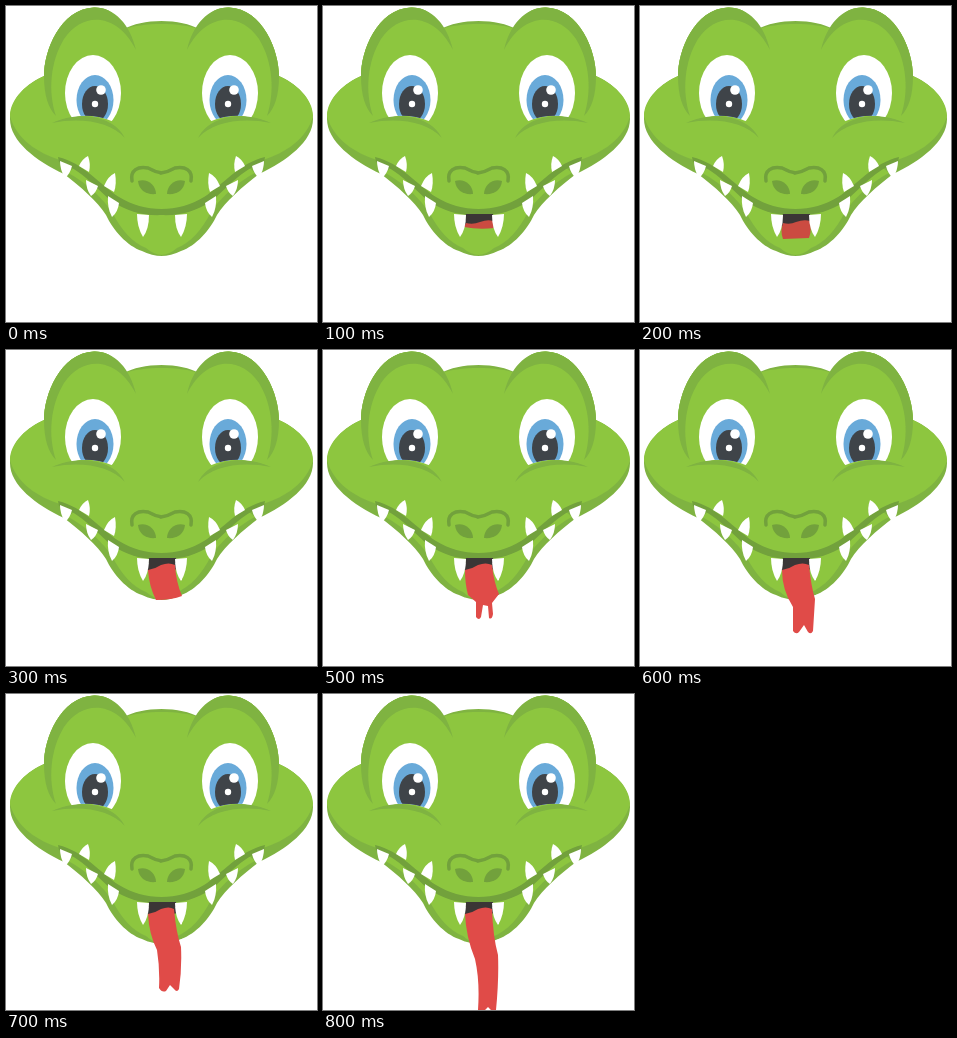
Write an HTML page that moves like this. It is 311x316 px and loops after 1000 ms.

```html
<!DOCTYPE html>
<html lang="en">
<head>
<meta charset="utf-8">
<title>Crocodile</title>
<style>
  html, body { margin: 0; width: 100%; height: 100%; overflow: hidden; background: #fff; }
  svg { display: block; width: 311px; height: 316px; }
  .skin { fill: #8dc63f; }
  .shade { fill: #7fb341; }
  .dark { fill: #72a13c; }
  .line { fill: none; stroke: #72a13c; stroke-width: 3.5; stroke-linecap: round; }
  .white { fill: #fff; }
  .mouth { fill: #3b3636; animation: open 1s step-end infinite; }
  .tongue { animation: grow 1s step-end infinite, tint 1s step-end infinite; }

  @keyframes open {
    0% { visibility: hidden; }
    10%, 100% { visibility: visible; }
  }
  @keyframes tint {
    0% { fill: #cb4b41; }
    30%, 100% { fill: #e04b48; }
  }
  @keyframes grow {
    0% { d: path("M0 0"); }
    10% { d: path("M143 217Q150 219 157 216Q165 213 170 215L171 222Q156 224 141 221Z"); }
    20% { d: path("M143 217Q150 219 156 216Q164 213 170 215Q172 224 169 232L143 233Q140 225 143 217Z"); }
    30% { d: path("M142 220Q149 219 155 215Q163 212 169 215Q170 232 176 246Q166 250 150 250Q143 236 142 220Z"); }
    40% { d: path("M142 220Q149 219 155 215Q163 212 169 215Q171 233 176 245L169 251L169 258Q167 261 165 254L160 254Q158 261 154 258L153 252L145 245Q142 234 142 220Z"); }
    50% { d: path("M142 220Q149 219 155 215Q163 212 169 215Q171 233 176 244L169 253L170 264Q169 270 166 268L165 256L160 255L158 267Q156 271 153 267L153 252L145 245Q142 234 142 220Z"); }
    60% { d: path("M142 220Q149 219 155 215Q163 212 169 215Q171 236 175 249L173 281Q171 285 168 282L164 275L159 282Q156 285 153 281L153 257Q142 240 142 220Z"); }
    70% { d: path("M142 220Q149 219 155 215Q163 212 168 215Q170 238 175 253Q176 275 173 295Q171 299 168 295L164 291L160 297Q156 299 153 294Q154 275 151 256Q143 240 142 220Z"); }
    80%, 100% { d: path("M142 220Q149 219 155 215Q163 212 169 215Q170 243 175 261Q176 285 173 316L168 316L165 313L162 316L155 316Q157 287 152 265Q143 243 142 220Z"); }
  }
</style>
</head>
<body>
<svg viewBox="0 0 311 316">
  <defs>
    <clipPath id="lid"><path d="M50 40H125V130Q106 108 74 110L50 116Z"/></clipPath>

    <g id="half">
      <path class="shade" d="M156 15C140 15 127 18 118 23C112 10 103 1 88 1.500C54 3 38 45 38 70C22 77 4 92 4 113C4 135 30 155 58 168C74 180 92 196 100 209C107 224 121 240 136 245Q146 250 156 250Z"/>
      <path class="skin" d="M62 167C80 176 98 194 106 206C115 224 127 237 140 242Q148 249 156 249V200L70 160Z"/>
      <path class="skin" d="M156 18C140 18 127 20 118 23C112 10 103 1 88 1.500C54 3 38 45 38 70C22 77 4 92 4 110C10 133 32 147 54 154C84 162 100 203 156 206Z"/>
      <path class="shade" d="M130 44C124 18 108 1 88 1.500C54 3 38 45 38 70Q38 98 50 110C42 86 44 56 58 33C78 4 112 8 130 44Z"/>
      <path class="dark" d="M52 151C78 157 94 179 113 191C126 199 140 203 156 203V209C137 210 121 205 107 196C91 184 77 164 53 156Z"/>
      <path class="line" d="M126 175C124 164 132 160 142 162Q149 166 156 167"/>
      <path class="dark" d="M132 175C141 172 150 179 150 188C141 189 133 185 132 175Z"/>
      <g clip-path="url(#lid)">
        <ellipse class="white" cx="87" cy="87" rx="28" ry="38"/>
        <ellipse cx="89" cy="94" rx="18.500" ry="25" fill="#69aad9"/>
        <ellipse cx="89" cy="98" rx="13" ry="18" fill="#3f4449"/>
        <circle class="white" cx="89" cy="98" r="3.200"/>
      </g>
      <path class="shade" d="M46 117C70 105 107 108 119 132C104 116 76 111 46 117Z"/>
    </g>

    <g id="teeth" class="white">
      <path d="M54 155L66 160Q64 168 59 172Q54 164 54 155Z"/>
      <path d="M82 150Q85 158 83 166L73 160Q76 153 82 150Z"/>
      <path d="M80 174L92 180Q90 187 85 190Q80 183 80 174Z"/>
      <path d="M109 167Q111 178 108 186L98 180Q102 170 109 167Z"/>
      <path d="M102 190L113 197Q112 206 106 211Q101 202 102 190Z"/>
      <path d="M131 208L143 209Q143 223 137 231Q131 221 131 208Z"/>
    </g>
  </defs>

  <use href="#half"/>
  <use href="#half" transform="matrix(-1 0 0 1 311 0)"/>
  <circle class="white" cx="95" cy="84" r="4.800"/>
  <circle class="white" cx="228" cy="84" r="4.800"/>

  <path class="mouth" d="M143 208H170L171 219Q156 224 141 220Z"/>
  <path class="tongue"/>
  <use href="#teeth"/>
  <use href="#teeth" transform="matrix(-1 0 0 1 312 0)"/>
</svg>
</body>
</html>
```
